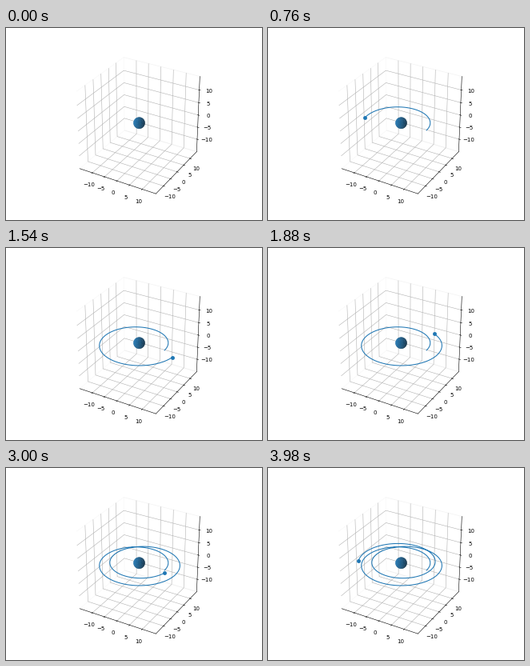
Recreate the animation shown at these times as a matplotlib script. Size 320 by 240 pixels, loop 4000 ms.

```python
import numpy as np
import matplotlib.pyplot as plt
from matplotlib.animation import FuncAnimation

FRAMES = 200
PERIOD = 132.5   # frames per radial oscillation
LIMIT = 15.28
TICKS = [-10, -5, 0, 5, 10]


def orbit(step):
    """Precessing orbit, radius between 10 and 15, near constant speed."""
    m = 2 * np.pi * step / PERIOD
    r = 12.5 - 2.5 * np.cos(m) + 0.125 * (1 - np.cos(2 * m))
    phi = np.radians(4.64 * step + 18.5 * np.sin(m) + 1.2 * np.sin(2 * m))
    return np.array([r * np.cos(phi), r * np.sin(phi), 0 * r])


def sphere(radius, n=30):
    u, v = np.meshgrid(np.linspace(0, 2 * np.pi, n), np.linspace(0, np.pi, n),
                       indexing="ij")
    return (radius * np.cos(u) * np.sin(v),
            radius * np.sin(u) * np.sin(v),
            radius * np.cos(v))


fig = plt.figure(figsize=(6.4, 4.8), dpi=50)
ax = fig.add_subplot(projection="3d")
ax.plot_surface(*sphere(2), color="C0")
trail, = ax.plot([], [], [], color="C0")
body, = ax.plot([], [], [], "o", color="C0")

ax.set(xlim=(-LIMIT, LIMIT), ylim=(-LIMIT, LIMIT), zlim=(-LIMIT, LIMIT),
       xticks=TICKS, yticks=TICKS, zticks=TICKS)
ax.set_box_aspect((1, 1, 1))
for axis in (ax.xaxis, ax.yaxis, ax.zaxis):
    axis.pane.fill = False

path = orbit(np.arange(FRAMES, dtype=float))


def update(i):
    # the body appears only once it has started to move
    end = i + 1 if i else 0
    trail.set_data_3d(*path[:, :end])
    body.set_data_3d(*path[:, max(end - 1, 0):end])
    return trail, body


anim = FuncAnimation(fig, update, frames=FRAMES, interval=20,
                     repeat=True, repeat_delay=0)
plt.show()
```
